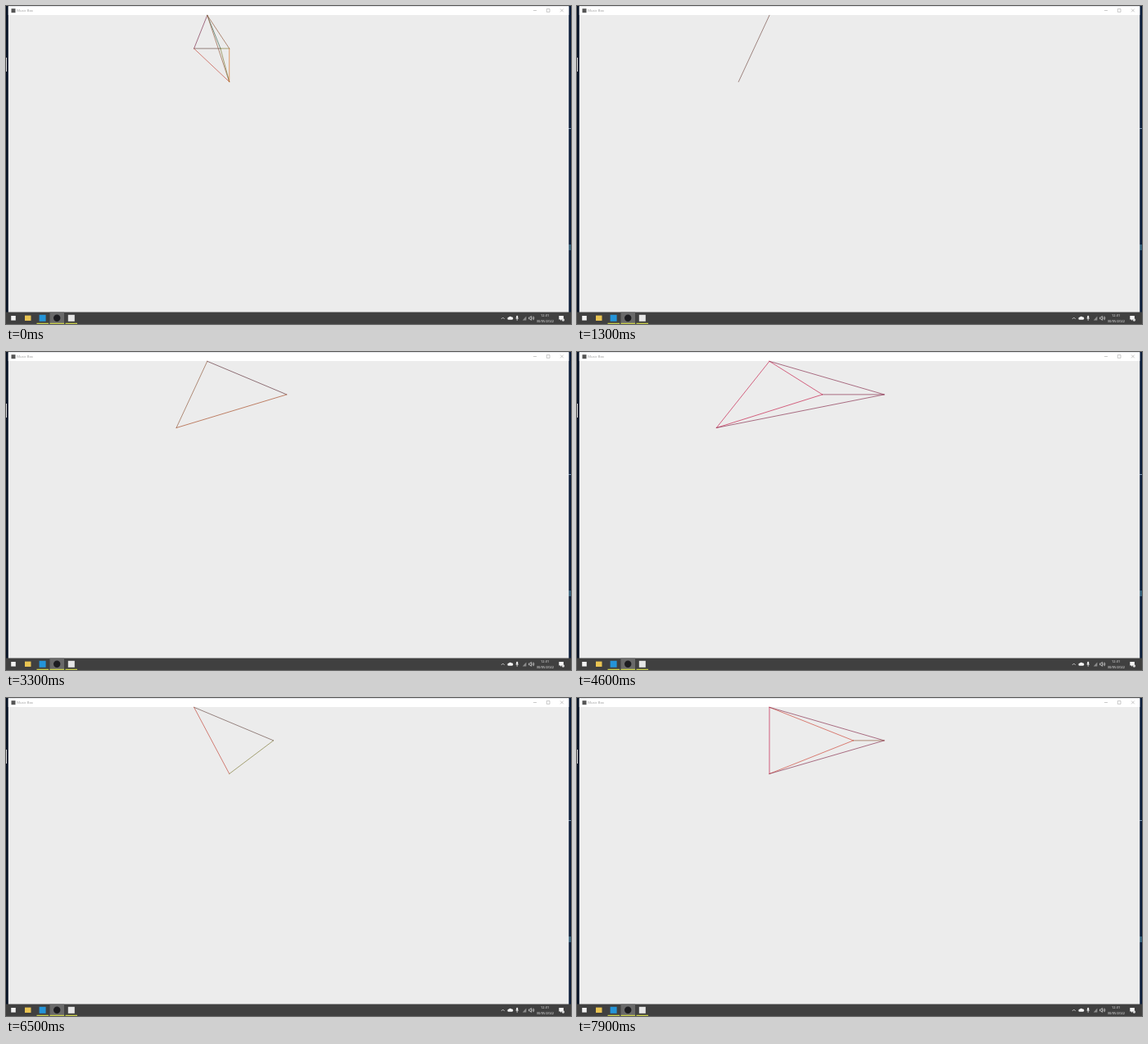
These frames come from a looping animation (690x388 px, 8 s). An HTML page:

```html
<!DOCTYPE html>
<html lang="en">
<head>
<meta charset="utf-8">
<title>Music Box</title>
<style>
  html, body { margin: 0; width: 100%; height: 100%; overflow: hidden; background: #ececec; }
  svg { display: block; width: 690px; height: 388px; }
  text { font-family: "Open Sans", "Noto Sans", sans-serif; font-size: 4px; }
  .thin { fill: none; stroke: #888; stroke-width: .45; }
  .tray { fill: none; stroke: #e4e4e4; stroke-width: .7; }
</style>
</head>
<body>
<svg viewBox="0 0 690 388">
  <!-- desktop edges and window -->
  <rect width="690" height="388" fill="#0a1c3a"/>
  <rect width="3" height="388" fill="#071225"/>
  <rect y="63" width="1" height="17" fill="#d8d8d8"/>
  <rect x="687" y="149" width="3" height="1" fill="#7590ad"/>
  <rect x="687" y="291" width="3" height="7" fill="#315d78"/>
  <rect x="2.8" y=".3" width="684.5" height="374" fill="#ececec"/>
  <rect x="2.8" y=".3" width="684.5" height="10.7" fill="#fff"/>
  <rect x="6.5" y="3.2" width="5" height="5" fill="#555"/>
  <text x="13.2" y="7.3" style="font-size:4.2px" fill="#999">Music Box</text>
  <path class="thin" d="M644 5.5h4M660.3 3.6h3.7v3.7h-3.7zM677 3.5l3.8 3.8M680.8 3.5l-3.8 3.8"/>

  <g id="web" stroke-width=".7" stroke-linecap="round"></g>

  <!-- taskbar -->
  <rect y="373.5" width="690" height="14.5" fill="#404040"/>
  <rect x="53.5" y="373.5" width="17.5" height="14.5" fill="#696969"/>
  <rect x="6.2" y="378" width="5.6" height="5.6" fill="#f2f2f2"/>
  <rect x="23" y="377.6" width="7.5" height="6.4" fill="#e9c452"/>
  <rect x="40.6" y="376.8" width="8" height="8" fill="#2494d8"/>
  <circle cx="62.2" cy="380.8" r="4.2" fill="#1d1d20"/>
  <rect x="75.8" y="376.8" width="8" height="8" fill="#e6e6e6"/>
  <path d="M37.5 387.4h14.5M53.5 387.4h17.5M72.5 387.4h14.5" stroke="#c9cf4a" stroke-width="1.1"/>
  <path class="tray" d="M604.8 382l2-2 2 2"/>
  <path d="M613.8 382.8a1.5 1.5 0 0 1 .2-3 2 2 0 0 1 3.5-.2 1.6 1.6 0 0 1 .4 3.2z" fill="#f4f4f4"/>
  <rect x="623.2" y="377.8" width="2" height="4" rx="1" fill="#f4f4f4"/>
  <path class="tray" d="M622.4 380.8q1.8 3 3.6 0M624.2 382.4v1.6"/>
  <path d="M630.8 383.4l4.6-4.8v4.8z" fill="#8d8d8d"/>
  <path class="tray" d="M638.6 379.9h1.2l1.6-1.5v5l-1.6-1.5h-1.2zM642.8 379.6q1 1.3 0 2.6M643.9 378.6q2 2.3 0 4.6"/>
  <g fill="#f2f2f2" text-anchor="middle">
    <text x="658.2" y="379.4">12:31</text>
    <text x="658.4" y="385.7">30/05/2022</text>
  </g>
  <path d="M675.3 378h5.6v4.4h-2.4l-1.5 1.6v-1.6h-1.7z" fill="#f4f4f4"/>
  <circle cx="680.4" cy="383" r="1.7" fill="#d8d8d8"/>
</svg>
<script>
const BEAT = 400, SEMITONE = 5.39, MIDDLE_C = 235, TOP = 11.3, ROW = 40.6;

// semitone above C and colour of each tone
const tones = {
  C: [0, "#c82450"], D: [2, "#504858"], F: [5, "#2f8a50"],
  G: [7, "#d8762c"], Ab: [8, "#7c2c2c"], B: [11, "#b02050"]
};

// each chord: its voices from top to bottom; "x2" holds it for two beats
const score = [
  "D4 | B3 F4 G4 | G4", "D4 | G5 | G3", "C4 | G5 | C3", "C4 | | F3",
  "B3 | F5 G5 | F3 x2", "F4 | Ab5 | G3 G4 x2", "D4 | Ab5 | G3 x2",
  "D4 | F5 | G3", "C4 | C5 D6 | C3", "C4 | D6 | F3 x2",
  "B3 | F5 G5 | G4 x2", "B3 | F5 | G4", "D4 | G5 | G3",
  "C4 | C5 | C3", "C4 | G5 D6 | C4"
];
const beats = score.flatMap(chord => {
  const [voices, hold = 1] = chord.split(" x");
  return Array(+hold).fill(voices);
});

function readVoice(voice, row) {
  return [...voice.matchAll(/([A-Z]b?)(\d)/g)].map(([, tone, octave], order) => {
    const [step, colour] = tones[tone];
    const x = MIDDLE_C + (12 * (octave - 4) + step) * SEMITONE;
    return { x, y: TOP + row * ROW, row, order, colour };
  });
}

// every note joins all others, but only its neighbours in the same row
const joined = (a, b) => a.row !== b.row || b.order - a.order === 1;

const line = (a, b) =>
  `<line x1="${a.x}" y1="${a.y}" x2="${b.x}" y2="${b.y}"
    style="stroke: color-mix(in srgb, ${a.colour}, ${b.colour})"/>`;

function drawChord(voices) {
  const notes = voices.split("|").flatMap(readVoice);
  web.innerHTML = notes.flatMap((a, i) =>
    notes.slice(i + 1).filter(b => joined(a, b)).map(b => line(a, b))).join("");
}

const web = document.getElementById("web");
let shown = -1;

function frame() {
  const beat = Math.floor(performance.now() / BEAT) % beats.length;
  if (beat !== shown) drawChord(beats[shown = beat]);
  requestAnimationFrame(frame);
}
frame();
</script>
</body>
</html>
```
